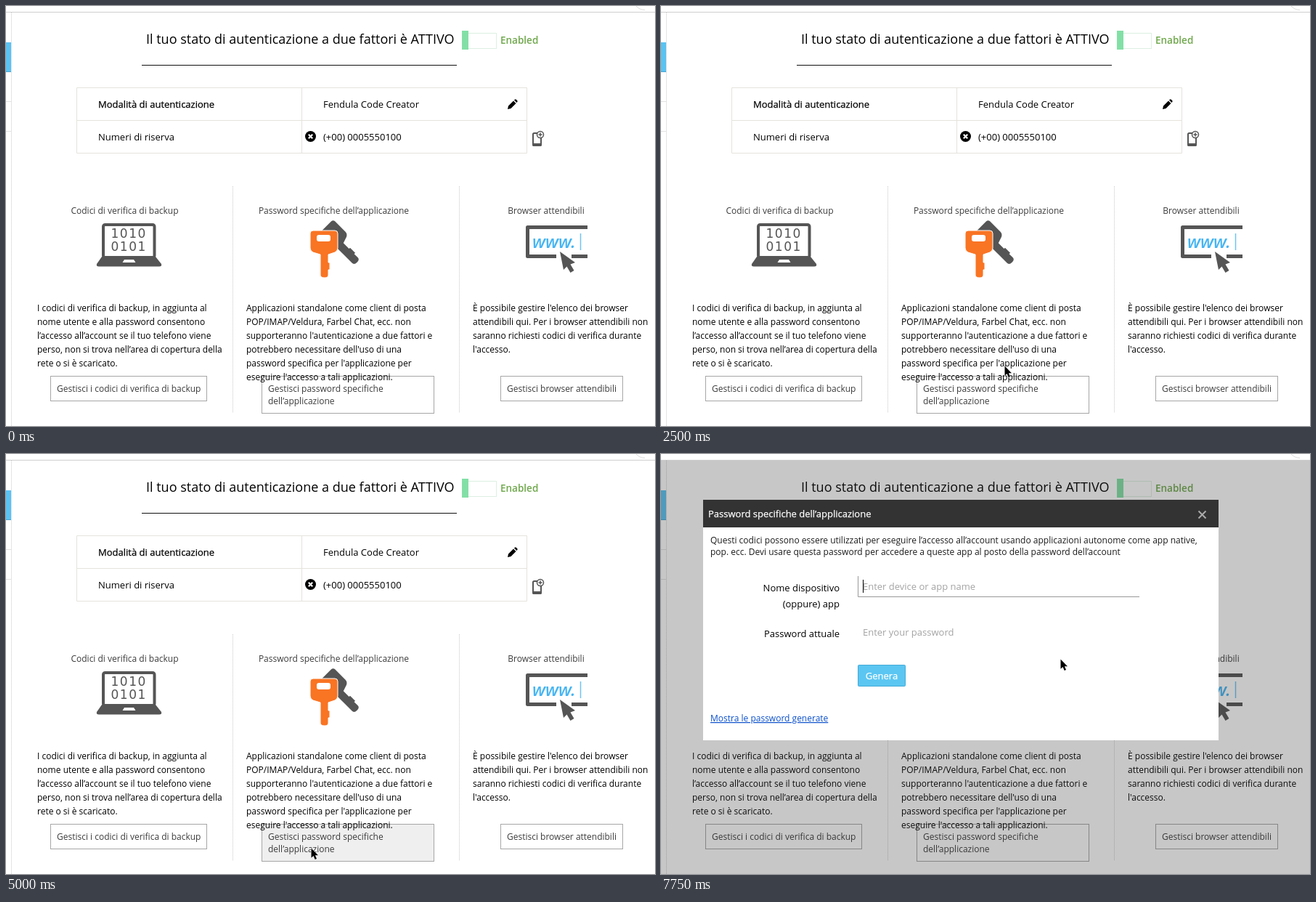
Write an HTML page that moves like this. It is 894x578 px and loops after 8 s.

```html
<!DOCTYPE html>
<html lang="it">
<head>
<meta charset="utf-8">
<title>Autenticazione a due fattori</title>
<style>
  html, body { margin: 0; width: 100%; height: 100%; overflow: hidden; background: #fff; }
  svg { display: block; width: 894px; height: 578px; font: 12px "Open Sans", sans-serif; fill: #000; }
  .mid { font-size: 13px; }
  .strong { stroke: currentColor; stroke-width: .25px; }
  .soft { fill: #3c3c3c; }
  .center { text-anchor: middle; }
  .right { text-anchor: end; }
  .line { fill: none; stroke: #c9c9c9; stroke-dasharray: 1 1; }
  .grid { fill: none; stroke: #e6e3dd; }
  .button { fill: #fff; stroke: #a6a6a6; }
  .button.hover { fill: #efefef; }
  .icon { fill: #555; }
  .hint { fill: #a3a3a3; }
</style>
</head>
<body>
<svg viewBox="0 0 894 578">
  <defs>
    <path id="key" d="M-15-16H15Q19-16 19-12V8Q19 12 15 14L6 17V28H8V38H6V45Q6 49 1 49Q-5 49-5 45V17L-15 14Q-19 12-19 8V-12Q-19-16-15-16Z"/>
  </defs>

  <!-- page frame -->
  <rect y="50" width="7" height="41" fill="#5bc3f2"/>
  <path d="M0 90.5H7" stroke="#4aa5d0"/>
  <path d="M0 131.5H7M0 172.5H7" stroke="#e2e2e2"/>
  <path d="M0 8.5H894" stroke="#cfcfcf"/>
  <path d="M868 0Q872 5 880 5.500" fill="none" stroke="#dcdcdc"/>
  <path class="line" d="M7.500 9V578M312.500 248V560M624.500 248V559"/>

  <!-- status -->
  <text x="193" y="52" font-size="18">Il tuo stato di autenticazione a due fattori è ATTIVO</text>
  <path d="M187 81.500H621" stroke="#111"/>
  <rect x="628.500" y="37.500" width="47" height="21" fill="#fff" stroke="#dcefe2"/>
  <rect x="628" y="34" width="9" height="26" fill="#82e0a6"/>
  <text x="681" y="52" font-size="13.500" font-weight="600" fill="#6fa84c">Enabled</text>

  <!-- table -->
  <path class="grid" d="M97.500 112.500H717.500V202.500H97.500ZM97 157.500H718M407.500 112V203"/>
  <g class="mid">
    <text class="strong" x="127" y="140">Modalità di autenticazione</text>
    <text x="437" y="140">Fendula Code Creator</text>
    <text x="127" y="185">Numeri di riserva</text>
    <text x="437" y="185">(+00) 0005550100</text>
  </g>
  <path d="M691 142L692 137.500L699 130.500L702.500 134L695.500 141ZM700 129.500L701.200 128.500Q702 128 702.800 128.800L704.300 130.300Q705 131 704.400 131.800L703.400 133Z"/>
  <circle cx="419.500" cy="179.500" r="7.500"/>
  <path d="M416.800 176.800L422.200 182.200M422.200 176.800L416.800 182.200" stroke="#fff" stroke-width="2.200"/>
  <rect x="726" y="175" width="11" height="17" rx="1.500" fill="#fff" stroke="#555" stroke-width="2"/>
  <path d="M725 189H738V191Q738 193 736 193H727Q725 193 725 191Z" class="icon"/>
  <circle cx="736" cy="177" r="4.500" fill="#fff" stroke="#555" stroke-width="1.500"/>
  <path d="M733.500 177H738.500M736 174.500V179.500" stroke="#555" stroke-width="1.500"/>

  <!-- column headings -->
  <g class="center soft">
    <text x="163.500" y="286">Codici di verifica di backup</text>
    <text x="451.500" y="286">Password specifiche dell’applicazione</text>
    <text x="744" y="286">Browser attendibili</text>
  </g>

  <!-- laptop -->
  <rect x="134" y="301" width="70.500" height="45" rx="2.500" fill="#fff" stroke="#555" stroke-width="4"/>
  <path class="icon" d="M132 345H206L214 355Q215 358.500 211 358.500H128Q124 358.500 125 355ZM163 349L160.500 353H178.500L176 349Z" fill-rule="evenodd"/>
  <g class="icon" font-family="DejaVu Sans, sans-serif" font-size="17" letter-spacing="1.500">
    <text x="144.500" y="319">1010</text>
    <text x="144.500" y="337">0101</text>
  </g>

  <!-- keys -->
  <use href="#key" class="icon" transform="translate(448.500 318.500) rotate(-45)"/>
  <use href="#key" fill="#f97423" stroke="#fff" stroke-width="1" transform="translate(438 325)"/>
  <rect x="428" y="315" width="19" height="9" rx="3" fill="#fff"/>

  <!-- browser -->
  <path d="M801 304.500H718.500V344.500H758M779 344.500H801" fill="none" stroke="#555" stroke-width="5" stroke-linejoin="round"/>
  <text x="725" y="333" font-size="24" font-weight="600" font-style="italic" fill="#45b5f3">www.</text>
  <path d="M791.500 313V336" stroke="#6fc3f2" stroke-width="1.500"/>
  <path class="icon" d="M763 338L768 363L772.500 358.500L777.500 367L782.500 364L777.500 355.500L784 353Z"/>

  <!-- buttons lie under the running text -->
  <rect class="button" x="61.500" y="509.500" width="215" height="34"/>
  <rect class="button" id="open" x="352.500" y="509.500" width="237" height="51"/>
  <rect class="button" x="681.500" y="509.500" width="168" height="34"/>
  <g class="soft">
    <text x="70" y="531">Gestisci i codici di verifica di backup</text>
    <text x="361" y="531">Gestisci password specifiche</text>
    <text x="361" y="548">dell’applicazione</text>
    <text x="690" y="531">Gestisci browser attendibili</text>
  </g>
  <g id="copy"></g>

  <!-- dialog -->
  <g id="dialog">
    <rect y="9" width="894" height="569" fill="#333" fill-opacity=".27"/>
    <rect x="58" y="63" width="710" height="331" fill="#fff"/>
    <rect x="58" y="63" width="710" height="38" fill="#333"/>
    <text class="mid strong" x="65" y="87" fill="#fff" color="#fff">Password specifiche dell’applicazione</text>
    <path d="M740.500 78.500L750.500 88.500M750.500 78.500L740.500 88.500" stroke="#aaa" stroke-width="2"/>
    <g fill="#1c1c1c">
      <text x="68" y="123">Questi codici possono essere utilizzati per eseguire l’accesso all’account usando applicazioni autonome come app native,</text>
      <text x="68" y="139">pop. ecc. Devi usare questa password per accedere a queste app al posto della password dell’account</text>
    </g>
    <g class="mid right">
      <text x="246" y="189">Nome dispositivo</text>
      <text x="246" y="211">(oppure) app</text>
      <text x="246" y="252">Password attuale</text>
    </g>
    <path d="M271.500 168V196.500H659" fill="none" stroke="#999"/>
    <g class="mid hint">
      <text x="278" y="187">Enter device or app name</text>
      <text x="278" y="250">Enter your password</text>
    </g>
    <path id="caret" d="M278.500 173V191" stroke="#000"/>
    <rect x="271.500" y="290.500" width="65" height="29" rx="1" fill="#5bc6f2" stroke="#45abd8"/>
    <text class="mid center strong" x="304" y="310" fill="#fff" color="#fff">Genera</text>
    <text x="68" y="368" fill="#0b50cc" text-decoration="underline">Mostra le password generate</text>
  </g>

  <path id="pointer" d="M1.500 1.500V14.800L4.500 12L6.700 17L9 16L6.900 11.200H11Z" stroke="#fff" stroke-width="1" paint-order="stroke"/>
</svg>
<script>
const LOOP = 8000;
const $ = id => document.getElementById(id);

const copy = [
  [43, ["I codici di verifica di backup, in aggiunta al", "nome utente e alla password consentono",
    "l’accesso all’account se il tuo telefono viene", "perso, non si trova nell’area di copertura della",
    "rete o si è scaricato."]],
  [331, ["Applicazioni standalone come client di posta", "POP/IMAP/Veldura, Farbel Chat, ecc. non",
    "supporteranno l'autenticazione a due fattori e", "potrebbero necessitare dell'uso di una",
    "password specifica per l'applicazione per", "eseguire l'accesso a tali applicazioni."]],
  [643, ["È possibile gestire l'elenco dei browser", "attendibili qui. Per i browser attendibili non",
    "saranno richiesti codici di verifica durante", "l'accesso."]]
];
$("copy").innerHTML = copy.map(([x, lines]) =>
  lines.map((s, i) => `<text x="${x}" y="${420 + 19 * i}">${s}</text>`).join("")).join("");

// pointer stops: time, left, top
const stops = [
  [500, 349, 3], [750, 371, 59], [1000, 403, 198], [1250, 416, 402],
  [1750, 402, 473], [2000, 395, 525], [2250, 399, 544], [2500, 472, 494],
  [2750, 383, 483], [3000, 420, 541], [3250, 488, 505], [3500, 427, 509],
  [3750, 420, 530], [5000, 419, 541], [7250, 571, 501], [7500, 543, 365],
  [7750, 549, 281]
];
const show = (el, on) => el.setAttribute("visibility", on ? "inherit" : "hidden");

function draw(t) {
  const at = stops.filter(s => s[0] <= t).pop();
  show($("pointer"), at);
  if (at) $("pointer").setAttribute("transform", `translate(${at[1]} ${at[2]})`);
  $("open").classList.toggle("hover", t >= 5000 && t < 7250);
  show($("dialog"), t >= 5500);
  show($("caret"), Math.floor((t - 5500) / 500) % 2 === 0);
}

const start = performance.now();
function tick() {
  draw((performance.now() - start) % LOOP);
  requestAnimationFrame(tick);
}
tick();
</script>
</body>
</html>
```
